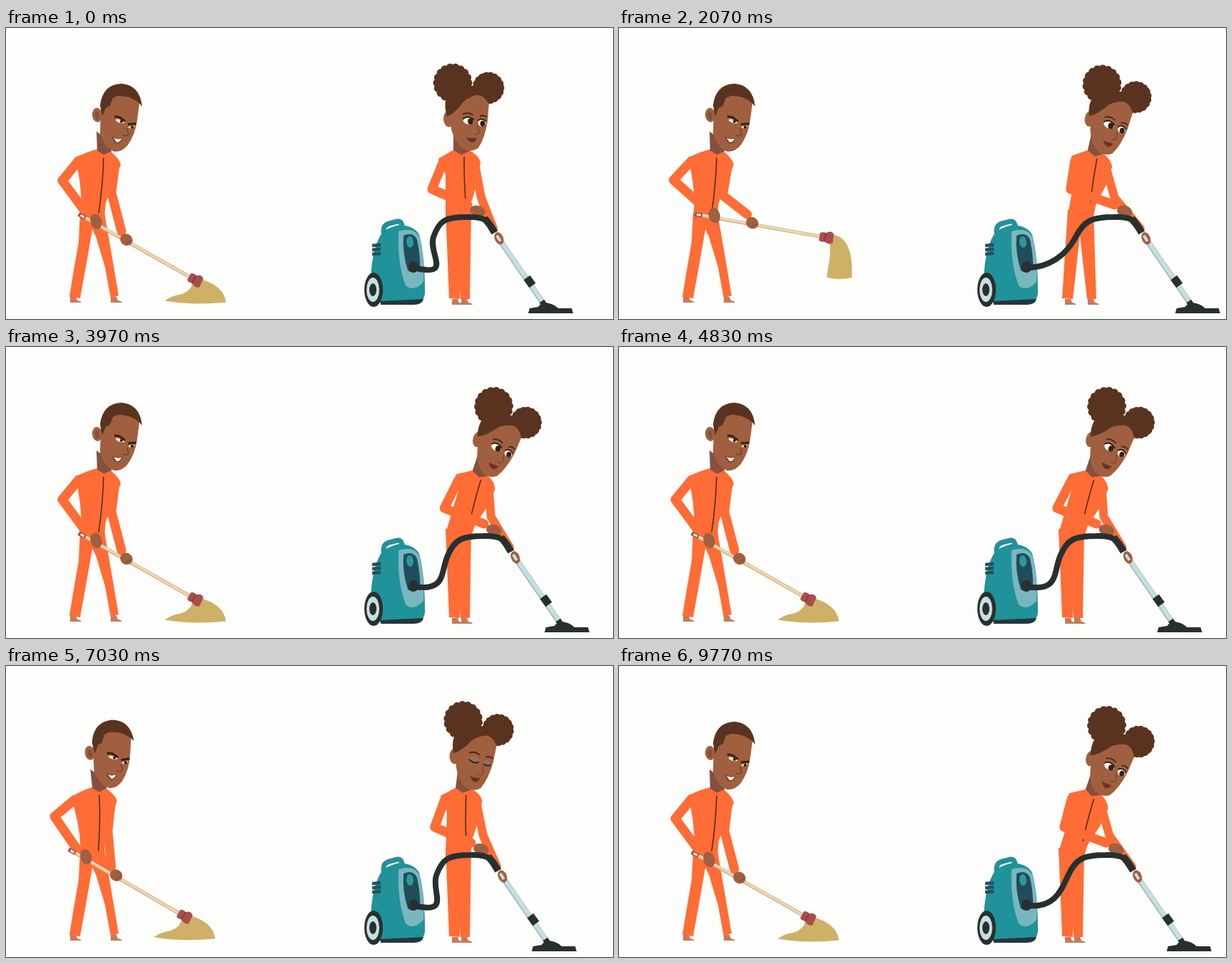
These frames come from a looping animation (852 by 408 pixels, 9810 ms). An HTML page with a canvas:

```html
<!DOCTYPE html>
<html>
<head>
<meta charset="utf-8">
<style>
html, body { margin: 0; width: 100%; height: 100%; overflow: hidden; background: #fdfdfb; }
canvas { display: block; }
</style>
</head>
<body>
<canvas id="stage" width="852" height="408"></canvas>
<script>
const ctx = document.getElementById('stage').getContext('2d');
const LOOP = 9.81, CYCLE = 6;
const ORANGE = '#ff6c35', SKIN = '#a0603f', SHADE = '#855040', HAIR = '#5a3320',
      DARK = '#28302f', TEAL = '#1f929a', PALE = '#c6dfe0';

const fill = (d, color) => { ctx.fillStyle = color; ctx.fill(new Path2D(d)); };
function line(d, color, width, cap = 'butt') {
  ctx.lineCap = cap;
  ctx.strokeStyle = color;
  ctx.lineWidth = width;
  ctx.stroke(new Path2D(d));
}
const limb = (shoulder, elbow, wrist, width) =>
  line(`M${shoulder}L${elbow}L${wrist}`, ORANGE, width, 'round');
function oval(x, y, rx, ry, color, turn = 0) {
  ctx.fillStyle = color;
  ctx.beginPath();
  ctx.ellipse(x, y, rx, ry, turn, 0, 7);
  ctx.fill();
}
function group(draw) { ctx.save(); draw(); ctx.restore(); }
function spin(x, y, angle) {
  ctx.translate(x, y);
  ctx.rotate(angle);
  ctx.translate(-x, -y);
}
function turned(x, y, cx, cy, angle) {
  const c = Math.cos(angle), s = Math.sin(angle);
  return [cx + (x - cx) * c - (y - cy) * s, cy + (x - cx) * s + (y - cy) * c];
}
const mix = (a, b, k) => a + (b - a) * k;

// 0 to 1 with soft ends between two times
function ramp(t, from, to) {
  const u = Math.min(1, Math.max(0, (t - from) / (to - from)));
  return u * u * (3 - 2 * u);
}
// Rises during the first span and falls during the second
const pulse = (t, up, top, fall, end) => ramp(t, up, top) - ramp(t, fall, end);

function foot(x, y) {
  fill(`M${x - 5} ${y - 8}h8l2 5q5 1 6 3h-16z`, '#c47b5c');
}

function manHead() {
  fill('M127 145L128 172 138 180 148 174 147 160Z', SHADE);
  oval(128, 122, 7, 10, SKIN, -.1);
  oval(128, 123, 3, 6, SHADE, -.1);
  fill('M133 115L145 92 186 96 187 108 184 130Q181 150 171 164Q162 175 151 173Q138 167 132 148Z', SKIN);
  fill('M135 124L132 108Q136 79 162 78Q188 80 191 110Q179 95 157 95L150 98 146 109 140 112Z', HAIR);
  line('M152 124L159 125 167 131M171 135L183 134', '#3a2119', 3.2);
  fill('M154 128Q161 127 167 133Q160 135 154 130ZM172 138L181 137Q178 142 172 140Z', '#f3e4c8');
  oval(162, 131, 2, 2, '#2b1a14');
  oval(177, 139, 2, 2, '#2b1a14');
  line('M170 141L172 149Q169 153 164 150', '#75442f', 1.5);
  fill('M149 152Q157 156 163 154Q162 162 155 162Q150 159 149 152Z', '#74402f');
  fill('M151 154Q157 157 162 155Q160 161 155 160Z', '#fffbf4');
}

function mopHead(x, y, hang) {
  const at = (floorX, floorY, looseX, looseY) =>
    `${x + mix(floorX, looseX, hang)} ${y + mix(floorY, looseY, hang)} `;
  fill(`M${at(5, -2, 7, -5)}Q${at(40, 7, 38, -3)}${at(43, 31, 34, 61)}Q${at(-3, 36, 22, 65)}`
    + `${at(-43, 29, 9, 61)}Q${at(-34, 22, 8, 52)}${at(-20, 20, 9, 32)}Q${at(-6, 15, 9, 12)}${at(-4, 4, 4, 2)}Z`, '#cfb067');
}

function man(t) {
  const back = pulse(t, .2, .85, 1.25, 1.75) + pulse(t, 4.9, 5.25, 5.5, 5.95);
  const lift = pulse(t, 1.55, 2.25, 3.07, 3.7);
  const pose = (a, b, c) => a + (b - a) * back + (c - a) * lift;
  const lean = -.072 * back;
  const angle = pose(.514, .525, .11), c = Math.cos(angle), s = Math.sin(angle);
  const x = pose(102, 88, 107), y = pose(261, 257, 261);
  const along = n => [x + n * c, y + n * s];
  const hip = [121, 265];
  const [lx, ly] = along(27), [rx, ry] = along(77 + 6 * lift), [kx, ky] = along(188);

  foot(95, 385);
  foot(152, 385);
  fill('M104 258L123 272 112 335 104 379 89 377 95 340 102 300Z', ORANGE);
  fill('M114 268L138 258 147 310 158 375 147 379 139 335 126 292Z', ORANGE);
  limb(turned(102, 186, ...hip, lean), [pose(79, 68, 76), pose(214, 211, 213)], [lx - 10, ly - 11], 13);
  group(() => {
    spin(...hip, lean);
    fill('M97 182Q112 174 128 170L138 178 148 174Q160 184 161 192L152 214 140 245 138 266 104 268Q108 235 101 200Z', ORANGE);
    line('M137 181Q136 220 130 260', '#5a2c1c', 1.6);
    manHead();
    line('M126 173L137 180 148 175', ORANGE, 4);
  });
  line(`M${x} ${y}L${along(181)}`, '#d0b083', 5);
  line(`M${x} ${y - .7}L${along(181)}`, '#efd9b4', 3);
  line(`M${x} ${y}L${along(11)}`, '#9b5548', 6);
  line(`M${along(3)}L${along(9)}`, '#f3e4d4', 3);
  mopHead(kx, ky, lift);
  group(() => {
    ctx.translate(kx, ky);
    ctx.rotate(angle);
    fill('M-10 -5Q-6 -8 -2 -6Q4 -12 9 -7L10 6Q5 10 -2 6Q-8 8 -10 5Z', '#aa4c4c');
    line('M-2 -6V6', '#86383c', 1.5);
  });
  limb(turned(153, 191, ...hip, lean), [pose(148, 143, 145), pose(231, 231, 235)], [rx - 7, ry - 14], 13);
  oval(lx + 1, ly - 3, 8, 11, SKIN, -.3);
  oval(rx, ry - 2, 9, 8, SKIN, .5);
  line(`M${rx - 1} ${ry + 3}l8 -4`, SHADE, 1.5);
}

function bun(x, y, r) {
  for (let i = 0; i < 18; i++) {
    const a = i * Math.PI / 9;
    oval(x + (r - 5) * Math.cos(a), y + (r - 5) * Math.sin(a), 5.5, 5.5, HAIR);
  }
  oval(x, y, r - 3, r - 3, HAIR);
}

function womanHead(blink) {
  fill('M628 142L628 172 639 180 651 173 650 155Z', SHADE);
  bun(627, 77, 27);
  bun(677, 84, 22);
  oval(621, 128, 7, 11, SKIN, -.1);
  fill('M620 112L640 92 667 88 678 104 676 130Q672 155 663 168Q654 175 642 170Q630 162 625 142Z', SKIN);
  fill('M619 124Q612 101 624 90Q646 74 672 86Q684 95 678 107Q671 93 660 94Q644 98 638 109Q631 117 624 122Z', HAIR);
  line('M641 121Q649 117 656 122M665 124Q670 121 675 125', '#4b2b20', 2);
  if (blink) {
    oval(649, 129, 7, 4, '#91705f', .2);
    oval(668, 132, 5, 4, '#91705f', .2);
    line('M642 130Q649 136 656 132M663 134Q668 137 673 134', '#2f2019', 2);
  } else {
    oval(649, 130, 7.5, 5, '#fff8ea', .2);
    oval(668, 133, 5.5, 5, '#fff8ea', .2);
    oval(652, 131, 3.8, 4.2, '#33201a');
    oval(669, 134, 3.5, 4, '#33201a');
    line('M641 128Q648 121 657 129M662 130Q668 125 674 131', '#2f2019', 1.8);
  }
  line('M662 136L664 147Q661 151 657 148', '#7a4935', 1.4);
  fill('M646 153Q652 155 656 154Q659 155 661 154Q658 162 652 160Q648 158 646 153Z', '#6d2f2c');
}

function vacuum() {
  line('M531 291Q527 277 538 274L550 271Q557 271 556 283', '#258f9c', 7);
  fill('M526 290Q533 280 552 276Q573 277 580 290Q588 320 588 372Q586 387 572 387L527 387 512 350Q514 310 526 290Z', TEAL);
  fill('M525 383L586 380Q584 388 572 388H526Z', '#26353c');
  fill('M551 285Q574 278 581 295Q588 330 586 356Q572 371 561 361Q549 330 551 285Z', '#79b7be');
  fill('M558 291Q572 285 577 297Q582 320 581 338Q572 346 564 340Q556 315 558 291Z', '#214c5a');
  oval(567, 300, 5, 8, '#2b989f', -.1);
  oval(572, 335, 7, 8, DARK);
  for (let i = 0; i < 3; i++) line(`M514 ${305 + 6 * i}l12 -1`, '#24505c', 4.5);
  oval(516, 367, 13, 24, DARK);
  oval(515, 367, 9, 17, PALE);
  oval(515, 367, 5, 9, DARK);
}

function hose(d) {
  const path = `M573 336C${628 - .45 * d} ${350 - .3 * d} ${592 + .78 * d} 316 ${600 + .86 * d} 293`
    + `S${616 + d} 265 ${648 + d} 265C${672 + d} 264 ${677 + d} 270 ${685 + d} 286`;
  line(path, DARK, 8);
}

function wand() {
  line('M672 267Q680 276 686 287', DARK, 10);
  line('M688 290L754 386', '#a3bdc0', 8);
  line('M688 289L754 385', PALE, 5.5);
  line('M731 350L739 361', DARK, 11);
  fill('M733 400L735 393 747 391Q750 386 757 385Q768 386 775 393L794 393 796 400Z', DARK);
  line('M752 383l4 6', DARK, 8);
}

function woman(t) {
  // A short stroke, a step forward with two long ones, then a last stroke before standing up
  const reach = 29 * pulse(t, 0, .55, .55, 1.2) + 50 * pulse(t, 1.2, 2.2, 3.4, 4.45)
    - 14 * pulse(t, 2.2, 2.75, 2.75, 3.4) + 8 * ramp(t, 3.8, 4.5) + 34 * ramp(t, 4.45, 5.3) - 42 * ramp(t, 5.3, 6);
  const step = pulse(t, 1.3, 2.1, 2.8, 3.5), hip = 13 * step, stride = 19 * step;
  const lean = .14 * pulse(t, 0, .55, .55, 1.25) + .19 * ramp(t, 1.2, 2.2)
    - .1 * pulse(t, 2.3, 3.05, 3.05, 3.7) + .1 * ramp(t, 3.1, 3.75) - .29 * ramp(t, 5.1, 6);
  const tilt = .09 * pulse(t, 0, .8, 1.2, 2.9) - .04 * pulse(t, 2.4, 3, 3.1, 3.6) + .04 * pulse(t, 3.3, 3.8, 5.1, 6);
  const blink = Math.abs(t - 1) < .09 || Math.abs(t - 3.07) < .09;
  const at = (x, y) => {
    const p = turned(x, y, 635, 264, lean);
    return [p[0] + hip, p[1]];
  };

  foot(631, 388);
  foot(644 + stride, 388);
  fill(`M${617 + hip} 255H${638 + hip}L637 380 622 379Z`, ORANGE);
  fill(`M${630 + hip} 255H${653 + hip}L${651 + stride} 380 ${638 + stride} 380Z`, ORANGE);
  limb(at(658, 191), [667 + reach * .6, 238], [684 + reach, 281], 12);
  group(() => {
    ctx.translate(hip, 0);
    spin(635, 264, lean);
    fill('M607 183Q616 178 628 171L639 178 651 172Q663 178 666 188L662 215 653 245 653 268 617 268 617 205Z', ORANGE);
    line('M643 180Q643 215 645 242', '#5a2c1c', 1.6);
    group(() => {
      spin(638, 172, tilt);
      womanHead(blink);
    });
    line('M627 173L639 180 652 174', ORANGE, 4);
  });
  limb(at(613, 189), [598 + reach * .75, 226], [648 + reach, 248], 13);
  oval(662 + reach, 257, 11, 8, SKIN, .3);
  hose(reach);
  group(() => {
    ctx.translate(reach, 0);
    wand();
    oval(692, 295, 6, 9, SKIN, -.4);
    line('M689 291L694 299', PALE, 4);
    line('M656 255Q664 252 671 260', SKIN, 6);
  });
}

function draw(now) {
  const t = now / 1000 % LOOP % CYCLE;
  ctx.fillStyle = '#fdfdfb';
  ctx.fillRect(0, 0, 852, 408);
  ctx.lineJoin = 'round';
  man(t);
  vacuum();
  woman(t);
  requestAnimationFrame(draw);
}
requestAnimationFrame(draw);
</script>
</body>
</html>
```
